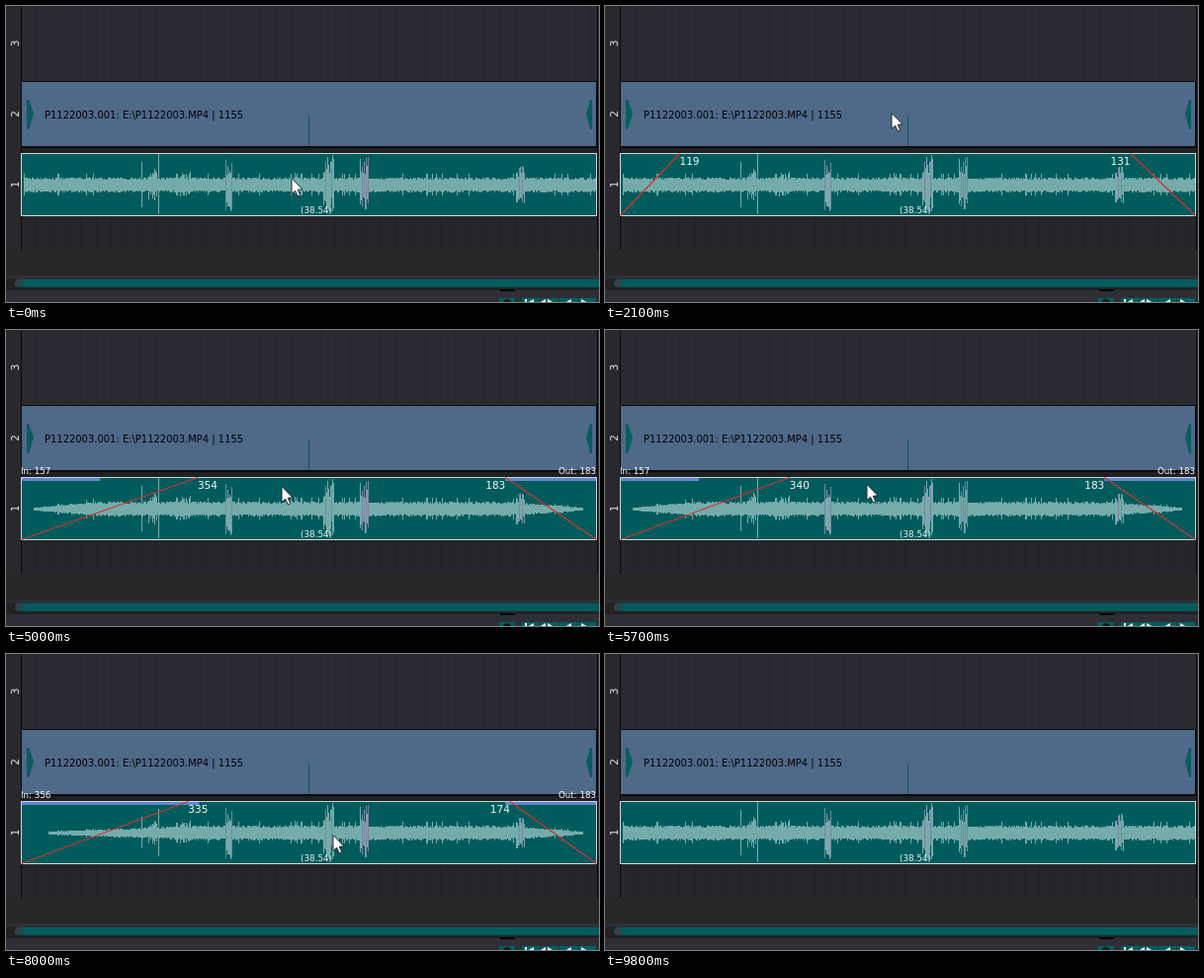
Animation, 600 px wide and 300 px high, one loop 9900 ms. Source, as an HTML page with a canvas:

```html
<!DOCTYPE html>
<html>
<head>
<meta charset="utf-8">
<style>
html, body { margin: 0; width: 600px; height: 300px; overflow: hidden; background: #26262c }
canvas { display: block }
</style>
</head>
<body>
<canvas id="stage" width="600" height="300"></canvas>
<script>
const c = document.getElementById('stage').getContext('2d');
const LOOP = 9900, LEFT = 15.5, RIGHT = 597.5, SCALE = 582 / 1155, MID = 181;

// pointer stops: time, x, y
const path = [
  [0, 289, 174], [600, 289, 174], [2100, 290, 108], [3500, 291.17, 84.5], [3900, 289, 171],
  [4300, 82, 165], [4700, 82, 165], [5000, 279, 158], [6400, 251, 154], [6600, 281, 155],
  [7000, 281, 155], [7500, 330, 175], [7700, 330, 175], [8000, 331, 183], [9000, 333, 380],
  [LOOP, 333, 380]
];
const drags = [
  { from: 600, to: 3500, both: true },
  { from: 4700, to: 6700, both: false },
  { from: 7700, to: 9600, both: true }
];

function pointerAt(t) {
  const i = path.findIndex(p => p[0] > t), [t0, x0, y0] = path[i - 1], [t1, x1, y1] = path[i];
  const f = (t - t0) / (t1 - t0);
  return [x0 + (x1 - x0) * f, y0 + (y1 - y0) * f];
}

// Vertical drags scale both fades and sideways moves tilt them; a single drag follows x only.
function dragFades([fadeIn, fadeOut], drag, t) {
  const [x0, y0] = pointerAt(drag.from), [x, y] = pointerAt(t);
  const rise = 1.9 * (y0 - y), tilt = 6 * (x - x0);
  const fades = drag.both ? [fadeIn + rise - tilt, fadeOut + rise + tilt] : [fadeIn + x - x0, fadeOut];
  return fades.map(v => Math.max(0, Math.round(v)));
}

function fadesAt(t) {
  let saved = [0, 0], live = null;
  for (const drag of drags) {
    if (t >= drag.to) saved = dragFades(saved, drag, drag.to);
    else if (t >= drag.from) live = dragFades(saved, drag, t);
  }
  return { saved, live };
}

let seed = 7;
const rnd = () => (seed = seed * 16807 % 2147483647) / 2147483647;

// loud moments: centre, half width, height
const bursts = [
  [137, 1, 23], [148, 5, 16], [154, 1, 31], [181, 6, 14], [225, 4, 27],
  [292, 2, 18], [326, 6, 31], [362, 5, 28], [520, 5, 20]
];
const wave = [];
for (let x = 18; x < 598; x++) {
  const burst = bursts.find(([mid, half]) => Math.abs(x - mid) < half);
  const peak = burst ? burst[2] : rnd() < .05 ? 11 : 0;
  const level = () => Math.max(5 + rnd() * 2.5, peak * (burst && burst[1] > 1 ? .35 + .65 * rnd() : 1));
  const up = level(), down = level() * .95;
  wave.push({ x, up, down, color: up > 14 && rnd() < .3 ? '#7787a2' : '#76abab' });
}

function rect(color, x, y, w, h) {
  c.fillStyle = color;
  c.fillRect(x, y, w, h);
}
function poly(color, ...pts) {
  c.fillStyle = color;
  c.beginPath();
  for (let i = 0; i < pts.length; i += 2) c.lineTo(pts[i], pts[i + 1]);
  c.closePath();
  c.fill();
}
function disc(color, x, y, r) {
  c.fillStyle = color;
  c.beginPath();
  c.arc(x, y, r, 0, 7);
  c.fill();
}
function line(color, width, x1, y1, x2, y2) {
  c.strokeStyle = color;
  c.lineWidth = width;
  c.beginPath();
  c.moveTo(x1, y1);
  c.lineTo(x2, y2);
  c.stroke();
}
function text(str, x, y, size, color, align = 'left') {
  c.font = size + 'px "DejaVu Sans", sans-serif';
  c.textAlign = align;
  c.fillStyle = color;
  c.fillText(str, x, y);
}

function background() {
  rect('#2a2a32', 0, 0, 600, 300);
  rect('#25252c', 0, 214, 600, 33);
  for (let x = 30; x < 598; x += 15.15) rect('rgba(0,0,0,.1)', Math.round(x), 0, 1, 247);
  rect('#28282d', 0, 0, 15, 247);
  for (const x of [15, 598]) rect('#0a0a0d', x, 0, 1, 247);
  rect('#202025', 16, 142, 582, 7);
  rect('#272727', 0, 247, 600, 26);
  rect('#2f2f35', 12, 273, 588, 4);
  rect('#222224', 0, 277, 600, 11);
  rect('#005c5c', 15, 277, 585, 8);
  disc('#2c4448', 13, 281, 4);
  rect('#2e2e36', 0, 288, 600, 12);
  rect('#08080a', 500, 287, 15, 2);
  for (let n = 1; n <= 3; n++) {
    c.save();
    c.translate(13, 252.5 - 71.5 * n);
    c.rotate(-Math.PI / 2);
    text(n, 0, 0, 10.5, '#e4e4ea', 'center');
    c.restore();
  }
}

function transport() {
  rect('#006060', 499, 296, 16, 4);
  disc('#10181a', 507, 301, 4);
  for (let i = 0; i < 4; i++) rect('#006060', 522 + 19 * i, 296, 18, 4);
  rect('#e4eeee', 525, 297, 2, 3);
  for (const x of [534, 546, 572]) poly('#e4eeee', x, 297, x, 305, x - 7, 301);
  for (const x of [548, 582]) poly('#e4eeee', x, 297, x, 305, x + 7, 301);
}

function videoStrip() {
  rect('#08090c', 16, 76, 582, 68);
  rect('#4f6988', 16, 77, 581, 65);
  poly('#0a5c60', 21, 95, 23, 95, 28, 109, 23, 125, 21, 125);
  poly('#0a5c60', 593, 95, 591, 95, 587, 109, 591, 125, 593, 125);
  text('P1122003.001: E:\\P1122003.MP4 | 1155', 39, 114, 9.95, '#000');
  line('#0a5a5c', 1, 306.5, 111, 306.5, 142);
}

function audioStrip([fadeIn, fadeOut]) {
  const inW = fadeIn * SCALE, outW = fadeOut * SCALE;
  rect('#005c5c', 16, 150, 582, 63);
  for (const { x, up, down, color } of wave) {
    const gain = Math.min(1, inW ? (x - LEFT) / inW : 1, outW ? (RIGHT - x) / outW : 1);
    if (gain < .15) continue;
    const top = Math.round(MID - up * gain), bottom = Math.round(MID + down * gain);
    rect(color, x, top, 1, bottom - top + 1);
  }
  if (fadeIn) {
    rect('#5f86cf', 16, 150, inW, 3);
    rect('#5f86cf', RIGHT - outW, 150, outW, 3);
    text('In: ' + fadeIn, 15, 146, 8.7, '#fff');
    text('Out: ' + fadeOut, 597, 146, 8.7, '#fff', 'right');
  }
  c.strokeStyle = '#ccd8d8';
  c.lineWidth = 1;
  c.strokeRect(15.5, 149.5, 582, 63);
  text('(38.54)', 298, 210, 8.8, '#e4f0f0');
}

function dragLine(fade, edge, dir) {
  if (!fade) return;
  const x = edge + dir * fade * SCALE;
  line('#cc3434', 1.3, edge, 212.5, x, 149.5);
  text(fade, x, 161, 10.5, '#f0f6f6', dir > 0 ? 'left' : 'right');
}

function pointer(x, y) {
  c.save();
  c.translate(Math.round(x), Math.round(y) + .5);
  c.beginPath();
  for (const [px, py] of [[0, 0], [0, 16], [3.6, 12.7], [6.2, 18.5], [8.8, 17.4], [6.3, 11.8], [11, 11.3]])
    c.lineTo(px, py);
  c.closePath();
  c.fillStyle = '#fff';
  c.strokeStyle = '#20282c';
  c.lineWidth = 1;
  c.fill();
  c.stroke();
  c.restore();
}

function draw(t) {
  const { saved, live } = fadesAt(t);
  background();
  transport();
  videoStrip();
  audioStrip(saved);
  if (live) {
    dragLine(live[0], LEFT, 1);
    dragLine(live[1], RIGHT, -1);
  }
  pointer(...pointerAt(t));
}

const start = performance.now();
function tick() {
  const t = (performance.now() - start) % LOOP;
  draw(Math.floor(t / 100) * 100);
  requestAnimationFrame(tick);
}
tick();
</script>
</body>
</html>
```
